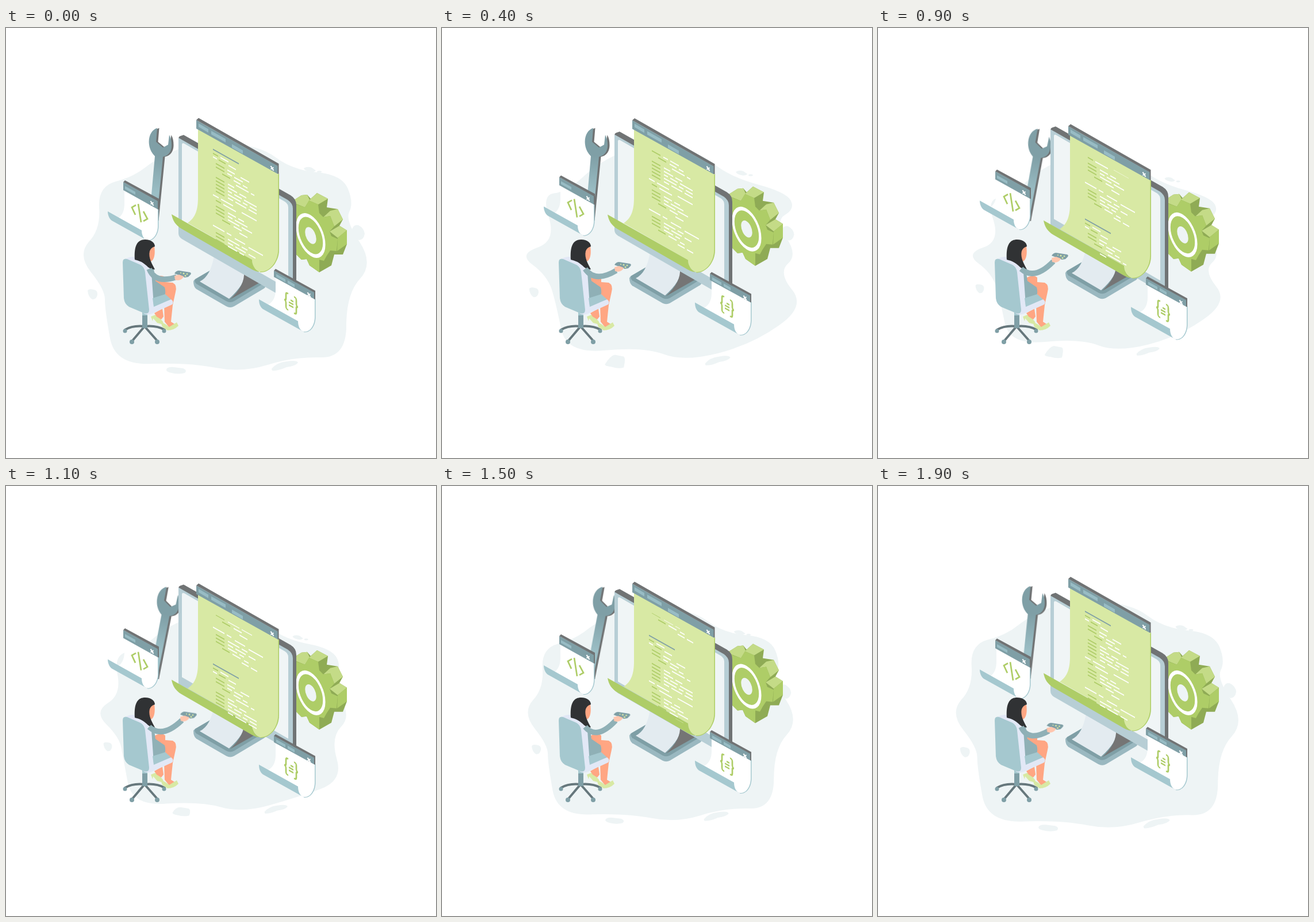
Write an HTML page without scripts that moves like this. It is 748 by 748 pixels and loops after 2000 ms.

```html
<!DOCTYPE html>
<html lang="en">
<head>
<meta charset="utf-8">
<title>Isometric coding scene</title>
<style>
@property --t { syntax: "<number>"; inherits: true; initial-value: 0; }

html, body { margin: 0; width: 100%; height: 100%; overflow: hidden; background: #fff; }
svg { display: block; width: 100%; height: 100%; animation: clock 2s steps(20) infinite; }
@keyframes clock { to { --t: 1; } }

/* amplitude a, phase p, n cycles per loop */
.bob {
  --n: 1;
  transform: translateY(calc(var(--a) * (cos(var(--p)) - cos(var(--t) * var(--n) * 1turn - var(--p)))));
}
.monitor { --a: -7.5px; --p: -5deg; }
.sheet { --a: 7.2px; --p: 32deg; }
.tag { --a: -9.5px; --p: -13deg; }
.data { --a: 6.7px; --p: -8deg; }
.gear { --a: -6.25px; --p: 0deg; --n: 2; }

.ground {
  transform-origin: 362px 385px;
  transform: scale(calc(.936 + .064 * cos(var(--t) * 1turn)));
}
.scroll { transform: translateY(calc(-98px * var(--t) - 49px * (1 - cos(var(--t) * .5turn)))); }

.wrench { transform-origin: 256px 340px; animation: wrench 2s infinite; }
@keyframes wrench {
  0%, 100% { transform: none; animation-timing-function: steps(4); }
  20% { transform: none; animation-timing-function: steps(2); }
  30% { transform: rotate(1.4deg); animation-timing-function: steps(3); }
  45% { transform: rotate(5.1deg); animation-timing-function: steps(4); }
  65% { transform: rotate(6.2deg); animation-timing-function: steps(4); }
  85% { transform: rotate(5.1deg); animation-timing-function: steps(2); }
  95% { transform: rotate(.8deg); animation-timing-function: steps(1); }
}

.blob { animation: blob 2s infinite; }
@keyframes blob {
  0%, 65%, 100% {
    animation-timing-function: steps(4);
    d: path("M148 425Q124 395 144 372Q165 350 162 312Q160 275 191 267Q222 259 243 242Q265 225 297 212Q330 199 385 201Q440 203 469 225Q498 247 541 251Q585 255 595 280Q605 305 597 320Q590 335 615 372Q640 410 616 436Q592 462 592 518Q592 575 546 573Q500 572 455 586Q410 600 365 591Q320 582 255 584Q190 588 181 540Q172 490 172 472Q172 455 148 425Z");
  }
  20%, 45% {
    animation-timing-function: steps(4);
    d: path("M148 413Q122 394 156 382Q191 371 178 328Q164 286 187 283Q209 281 238 255Q266 229 298 214Q329 199 386 200Q443 201 475 227Q506 253 558 267Q610 281 618 296Q626 312 608 322Q589 333 610 364Q631 395 613 411Q595 427 620 458Q646 489 597 523Q548 558 486 574Q423 590 387 576Q350 562 280 569Q209 576 200 530Q191 484 183 458Q174 432 148 413Z");
  }
}
.pebble { animation: pebble 2s infinite; }
@keyframes pebble {
  0%, 65%, 100% { animation-timing-function: steps(4); d: path("M279 594Q281 589 292 590L308 592Q316 595 311 600Q300 603 288 600Q278 598 279 594Z"); }
  20%, 45% { animation-timing-function: steps(4); d: path("M280 594Q290 578 298 577L314 580Q318 583 314 600Q305 603 292 599Q278 597 280 594Z"); }
}

.arm { animation: arm 2s infinite; }
@keyframes arm {
  0% { d: path("M249 419Q260 446 297 433"); animation-timing-function: steps(4); }
  20% { d: path("M249 419Q266 444 303 422"); animation-timing-function: steps(2); }
  30% { d: path("M249 419Q268 442 305 417"); animation-timing-function: steps(3); }
  45% { d: path("M249 419Q272 440 305 406"); animation-timing-function: steps(4); }
  65% { d: path("M249 419Q272 440 307 409"); animation-timing-function: steps(4); }
  85% { d: path("M249 419Q266 446 297 407"); animation-timing-function: steps(2); }
  95% { d: path("M249 419Q261 446 297 426"); animation-timing-function: steps(1); }
  100% { d: path("M249 419Q260 446 297 433"); }
}
.hand { animation: hand 2s infinite; }
@keyframes hand {
  0% { transform: none; animation-timing-function: steps(4); }
  20% { transform: translate(7px, -15px); animation-timing-function: steps(2); }
  30% { transform: translate(9px, -20px); animation-timing-function: steps(3); }
  45% { transform: translate(9px, -31px); animation-timing-function: steps(4); }
  65% { transform: translate(11px, -28px); animation-timing-function: steps(4); }
  85% { transform: translate(0, -30px); animation-timing-function: steps(2); }
  95% { transform: translate(.5px, -10px); animation-timing-function: steps(1); }
  100% { transform: none; }
}

.mist { fill: #eef4f5; }
.slate { fill: #7f9fa6; }
.dark { fill: #707374; }
.blue { fill: #a5c8cf; }
.chip { fill: #98bcc4; }
.white { fill: #fff; }
.lime { fill: #d8e9a4; }
.leaf { fill: #aecd67; }
.moss { fill: #8fab55; }
.pale { fill: #c4db87; }
.skin { fill: #ffa683; }
.line { fill: none; stroke: #fff; stroke-width: 2; }
.line.g { stroke: #aecd67; }
.line.s { stroke: #7f9fa6; }
.line.bold { stroke-width: 2.7; }
</style>
</head>
<body>
<svg viewBox="0 0 748 748">
  <defs>
    <clipPath id="view"><path d="M-3 -3H95V158H-3Z"/></clipPath>
    <linearGradient id="steel" x1="0" y1="0" x2="0" y2="1">
      <stop offset=".3" stop-color="#7f9fa6"/>
      <stop offset=".7" stop-color="#9bbec5"/>
    </linearGradient>
    <path id="spanner" d="M263 174C253 177 247 189 249 203C250 212 255 219 259 223L249 335H262L273 224C283 222 288 214 288 204C288 197 287 191 284 186L282 203L273 208L261 198Z"/>
    <path id="x" class="line" d="M-2.5 -4L2.5 4M2.5 -1.5L-2.5 1.5"/>
    <g id="code">
      <path class="line s" d="M0 0H45"/>
      <path class="line g" d="M0 7h9M10 13h12M5 22h15M5 28h15M16 34h14M5 46h15M5 52h15M5 58h15M5 64h15M5 70h15M5 86h9M5 96h15M5 102h15M5 108h15M16 114h14M5 142h15M5 148h15M5 154h15M16 160h13"/>
      <path class="line" d="M13 7h14M0 13h7M27 13h13M25 22h13M25 28h8M37 28h15M36 34h12M52 34h8M48 22h15M40 40h22M66 40h6M26 46h11M26 52h16M46 52h12M26 58h7M37 58h13M54 58h22M26 64h22M52 64h8M64 64h12M26 70h9M39 70h19M62 70h14M0 79h10M14 79h21M18 86h22M50 82h26M26 96h14M44 96h10M26 102h8M38 102h22M26 108h20M50 108h18M36 114h14M46 120h14M0 132h20M24 132h8M38 134h18M62 136h25M26 142h20M50 142h10M26 148h9M39 148h18M62 148h12M26 154h16M46 154h8M34 160h14M54 160h8M50 166h12M66 166h11"/>
    </g>
  </defs>

  <g class="ground mist">
    <path class="blob"/>
    <path class="pebble"/>
    <path d="M602 350Q605 341 613 343Q623 348 624 358Q622 369 614 369Q603 363 602 350Z"/>
    <path d="M518 244Q524 240 532 243L539 248Q535 252 528 250Q519 248 518 244Z"/>
    <ellipse cx="545" cy="250" rx="4" ry="1.8"/>
    <path d="M142 457Q144 453 152 455Q160 456 159 464Q157 473 150 472Q143 468 142 457Z"/>
    <path d="M462 593Q470 582 488 580Q506 577 508 582Q504 588 488 590Q472 597 463 596Z"/>
  </g>

  <g class="wrench">
    <use href="#spanner" class="dark" x="3.500"/>
    <use href="#spanner" fill="url(#steel)"/>
  </g>

  <g class="bob tag">
    <path class="blue" d="M206 282L265.500 315V346C265 359 257 371 246 370Z"/>
    <path class="white" d="M206 281L264 314V345C264 358 256 370 246 369C238 366 235 360 236 352L195 331C204 325 206 315 206 305Z"/>
    <path class="blue" d="M177 319L236 352C236 360 239 367 245 369L184 335C180 332 177 326 177 319Z"/>
    <path class="slate" d="M204 268L265 301V316L204 282Z"/>
    <path class="dark" d="M204 268L207 265L266 297V316L264 315V301Z"/>
    <path class="chip" d="M207 275L225 285V290L207 280Z"/>
    <use href="#x" x="254" y="305"/>
    <path class="line g bold" d="M226 308L219 312L225 325M230 306L235 338M239 319L246 332L239 336"/>
  </g>

  <g class="bob gear">
    <path class="moss" d="M495 303L514 291L524 290L530 297L541 287L560 297L558 312L577 315L586 333L580 344L593 352V376L586 394L571 394L566 413L545 425L528 413L523 402L514 403L505 394H495Z"/>
    <path class="pale" d="M495 303L514 291L524 290L528 299L520 312L505 306Z"/>
    <path class="pale" d="M527 300L541 287L560 297L543 307Z"/>
    <path class="pale" d="M552 329L564 318L577 315L586 333L571 345L564 327Z"/>
    <path class="pale" d="M563 354L580 344L593 352L577 365Z"/>
    <path class="leaf" d="M577 365L593 352V376L576 388Z"/>
    <path class="leaf" d="M495 303L520 312L527 300L543 307L545 322L552 329L564 327L571 345L563 354L566 362L577 367L575 388L564 387L558 396L553 405L545 403V425L528 413L523 402L514 403L505 394H495Z"/>
    <g transform="matrix(.72 .45 0 1 530 361)">
      <circle r="32.500" fill="none" stroke="#fff" stroke-width="6"/>
      <circle r="13.500" class="mist"/>
    </g>
  </g>

  <g class="bob monitor">
    <path fill="#9ab8c0" d="M329 437L365 416L452 444Q453 450 449 453L397 484Q390 488 383 484L331 454Q326 450 326 441Q326 439 329 437Z"/>
    <path class="slate" d="M329 437L365 416L450 443L397 475Q390 479 383 475L331 445Q327 441 329 437Z"/>
    <path fill="#e3ebf0" d="M362 396L415 426Q417 445 388 471L337 441Q356 432 362 396Z"/>
    <path fill="#757575" d="M414 424L441 443L390 472Q416 448 414 424Z"/>
    <path class="dark" d="M300 193Q300 189 303 188L309 186L495 291Q505 297 505 308V472L497 476Z"/>
    <path fill="#b7ced5" d="M300 191L490 299Q499 305 499 314V478L306 367Q300 363 300 357Z"/>
    <path fill="#f0f5f6" d="M306 203Q306 199 310 201L485 302Q491 306 491 312V454L306 347Z"/>
  </g>

  <g class="bob sheet">
    <path class="leaf" d="M430 300L475 253V386C475 407 459 426 442 425Z"/>
    <path class="lime" d="M334 175L473.500 252V385C473 407 459 425 441 424C432 420 428 412 428 403L316 339C330 330 334 315 334 295Z"/>
    <path class="leaf" d="M288 324L428 403C428 412 433 421 441 424C436 424 432 422 428 420L305 349C295 343 290 335 288 324Z"/>
    <path class="slate" d="M331 160L473 240V254L331 175Z"/>
    <path class="dark" d="M331 160L335 156.500L474.500 236V254L472.500 253V240Z"/>
    <path class="chip" d="M335 166L352 176V182L335 172ZM357 179L382 193V199L357 185ZM393 202L412 213V219L393 208Z"/>
    <use href="#x" x="463" y="244"/>
    <g transform="matrix(1 .56 0 1 360 211)" clip-path="url(#view)">
      <g class="scroll">
        <use href="#code"/>
        <use href="#code" y="196"/>
      </g>
    </g>
  </g>

  <g class="bob data">
    <path class="blue" d="M500 460L538.500 471V504C538 520 528 531 518 529Z"/>
    <path class="white" d="M469 432L537 470V503C537 518 528 530 518 528C510 525 507 518 508 510L456 481C466 476 469 466 469 455Z"/>
    <path class="blue" d="M440 472L508 510C508 518 511 526 517 528L447 489C442 485 440 479 440 472Z"/>
    <path class="slate" d="M466 422L537 460V472L466 433Z"/>
    <path class="dark" d="M466 422L469 419L538 457V472L536 471V460Z"/>
    <path class="chip" d="M470 428L486 437V442L470 433ZM490 439L502 446V451L490 444Z"/>
    <use href="#x" x="527" y="464"/>
    <path class="line g bold" transform="matrix(1 .55 0 1 496 479)" d="M-5 -14Q-9 -15 -9 -10V-4Q-9 0 -12 0Q-9 0 -9 4V10Q-9 15 -5 14M5 -14Q9 -15 9 -10V-4Q9 0 12 0Q9 0 9 4V10Q9 15 5 14M-1 -5H4M-4 0H4M-4 5H4"/>
  </g>

  <g>
    <path class="blue" d="M237 492H246V521H237Z"/>
    <path fill="none" stroke="#66777c" stroke-width="4" stroke-linecap="round" stroke-linejoin="round" d="M207 525Q220 517 241 519L219 545M241 519L263 544M241 519Q262 517 276 525"/>
    <path class="slate" d="M237 500H246V522H237Z"/>
    <g class="slate">
      <circle cx="207" cy="527" r="3.500"/><circle cx="219" cy="546" r="4"/><circle cx="263" cy="546" r="4"/><circle cx="275" cy="527" r="3.500"/>
    </g>

    <path class="lime" d="M252 502L262 498L273 511L274 516L263 513L256 505L255 510Z"/>
    <path class="skin" d="M258 496L272 488L274 502L270 507L262 502Z"/>
    <path class="skin" d="M256 436Q270 427 277 434L277 442L290 443Q298 447 295 459L290 482L287 511L295 516L284 521L276 511L275 482L279 467L262 458Z"/>
    <path class="lime" d="M269 511L277 515L284 520L297 512L300 518Q292 526 281 526L272 520Z"/>
    <path fill="#8fb0b6" d="M243 410L257 418L260 440L276 451Q279 460 275 468L256 482L252 425Z"/>
    <path fill="#e2e8f6" d="M208 402Q218 395 228 400L245 409Q252 414 253 425L257 482L287 472Q293 476 289 481L256 496Q247 501 239 496Z"/>
    <path class="blue" d="M255 470L277 463L287 472L257 485Z"/>
    <path class="blue" d="M203 408Q203 400 211 402L234 412Q241 416 242 425L249 490Q249 499 240 496L214 485Q206 480 205 470Z"/>
    <path class="skin" d="M247 385L258 380C260 392 258 404 252 406L247 403Z"/>
    <path fill="#303234" d="M224 403C223 385 225 368 242 368C253 368 259 374 259 380Q252 382 250 388C247 400 255 412 259 420Q250 420 244 413Q235 405 224 403Z"/>
    <path class="arm" fill="none" stroke="#8fb0b6" stroke-width="9.500"/>
    <g class="hand">
      <path class="slate" d="M293 427Q296 422 301 422L320 425Q323 426 321 429L317 433L311 434Z"/>
      <path fill="#ffc6ae" d="M293 431L301 429L309 432Q307 438 299 439L294 438Z"/>
      <g class="lime"><circle cx="309" cy="427" r="1.500"/><circle cx="315" cy="428" r="1.300"/><circle cx="312" cy="431" r="1.500"/><circle cx="304" cy="426" r="1"/></g>
    </g>
  </g>
</svg>
</body>
</html>
```
